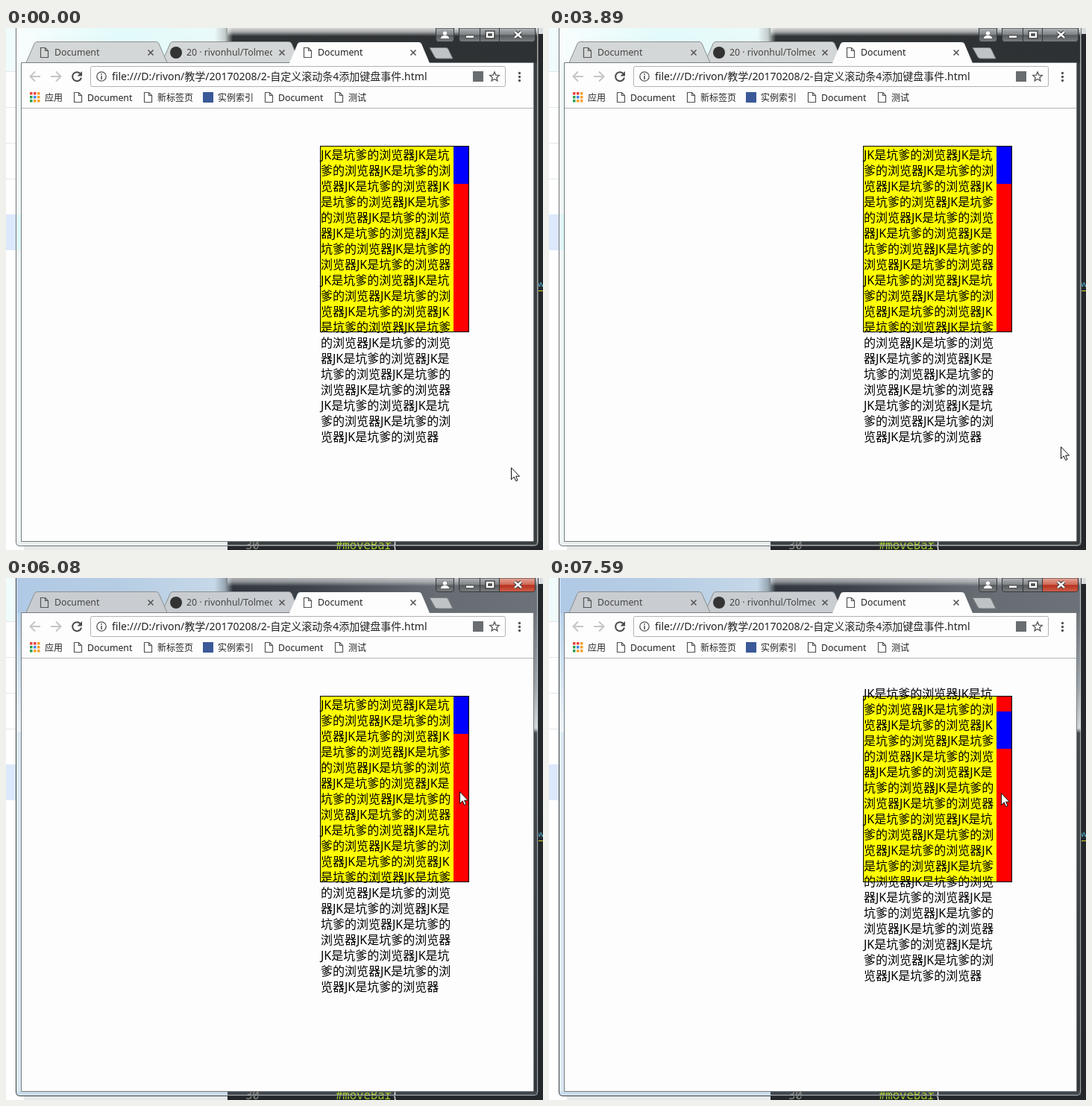
Write an HTML page that moves like this. It is 720 by 700 pixels and loops after 8 s.

```html
<!DOCTYPE html>
<html lang="zh-CN">
<head>
<meta charset="utf-8">
<title>Scroll box</title>
<style>
  html, body { margin: 0; width: 100%; height: 100%; overflow: hidden; background: #fff; }
  svg { display: block; width: 720px; height: 700px; }
  text { font-family: "Noto Sans", "Noto Sans CJK SC", "Noto Sans CJK", sans-serif; white-space: pre; }
  .code { font: 15.6px "Noto Sans Mono", monospace; }
  .line { fill: none; stroke: #555; stroke-width: 1.3; }
</style>
</head>
<body>
<svg viewBox="0 0 720 700">
  <defs>
    <linearGradient id="idleTop">
      <stop offset="0" stop-color="#f8fdfd"/><stop offset=".2" stop-color="#e2fafa"/>
      <stop offset=".38" stop-color="#eafafa"/><stop offset=".4" stop-color="#c4cccc"/>
      <stop offset=".415" stop-color="#303436"/><stop offset="1" stop-color="#2e3133"/>
    </linearGradient>
    <linearGradient id="liveTop">
      <stop offset="0" stop-color="#b0c9e5"/><stop offset=".2" stop-color="#b6cde4"/>
      <stop offset=".38" stop-color="#c6d8e8"/><stop offset=".4" stop-color="#98a6b2"/>
      <stop offset=".415" stop-color="#30373e"/><stop offset=".55" stop-color="#3a4148"/>
      <stop offset=".8" stop-color="#666c72"/><stop offset="1" stop-color="#6c7278"/>
    </linearGradient>
    <linearGradient id="liveLeft" x2="0" y2="1">
      <stop offset="0" stop-color="#b9d2ea"/><stop offset="1" stop-color="#eef5fa"/>
    </linearGradient>
    <linearGradient id="liveRight" x2="0" y2="1">
      <stop offset="0" stop-color="#70767b"/><stop offset=".15" stop-color="#9aa1a6"/>
      <stop offset=".24" stop-color="#d0d5d8"/><stop offset=".25" stop-color="#454a4f"/>
      <stop offset="1" stop-color="#33383c"/>
    </linearGradient>
    <linearGradient id="shine" x2="0" y2="1">
      <stop offset="0" stop-color="#fff" stop-opacity=".8"/><stop offset=".45" stop-color="#fff" stop-opacity=".6"/>
      <stop offset="1" stop-color="#fff" stop-opacity="0"/>
    </linearGradient>
    <linearGradient id="button" x2="0" y2="1">
      <stop offset="0" stop-color="#b4b7b9"/><stop offset=".5" stop-color="#7c8082"/>
      <stop offset=".52" stop-color="#565a5c"/><stop offset="1" stop-color="#7a7e80"/>
    </linearGradient>
    <linearGradient id="closeRed" x2="0" y2="1">
      <stop offset="0" stop-color="#e5a79a"/><stop offset=".5" stop-color="#cf6653"/>
      <stop offset=".52" stop-color="#b62f1c"/><stop offset="1" stop-color="#d0604a"/>
    </linearGradient>
    <clipPath id="tabClip"><path d="M240 20H357V46H240z"/></clipPath>
  </defs>

  <g id="desktop">
    <path fill="#fff" d="M0 0H720V700H0z"/>
    <path fill="#f0fbfc" d="M0 0H13V58H0z"/>
    <path stroke="#e4e6e8" d="M0 58.5H13M0 106.5H13M0 154.5H13M0 202.5H13"/>
    <path fill="#dce8fb" d="M0 250H13V298H0z"/>
    <path fill="#e6e9ea" d="M24 694H297V700H24z"/>
    <path fill="#23272a" d="M297 690H720V700H297zM713 8H720V700H713z"/>
    <path fill="#d9dddf" d="M713 0H720V8H713z"/>
    <path stroke="#d6d622" d="M713 352.5H720"/>
    <text x="713" y="347" font-size="11" fill="#55b7d3">w</text>
  </g>

  <g id="idle">
    <path fill="url(#idleTop)" d="M14 0H713V47H14z"/>
    <path fill="url(#shine)" d="M297 0H713V11H297z"/>
    <path fill="#f0f7f7" d="M14 47H21V688H14z"/>
    <path fill="#dff8fa" d="M14 250H21V298H14z"/>
    <path fill="#3b3f41" d="M707 47H713V690H707zM297 688H713V694H297z"/>
    <path fill="#e9eeee" d="M14 688H297V694H14z"/>
  </g>
  <g id="live">
    <path fill="url(#liveTop)" d="M14 0H713V47H14z"/>
    <path fill="url(#shine)" opacity=".75" d="M297 0H713V11H297z"/>
    <path fill="url(#liveLeft)" d="M14 47H21V206H14z"/>
    <path fill="#dbe8f2" d="M14 206H21V688H14z"/>
    <path fill="url(#liveRight)" d="M707 47H713V690H707z"/>
    <path fill="#c9dcec" d="M14 688H297V694H14z"/>
    <path fill="#42484e" d="M297 688H713V694H297z"/>
  </g>
  <text class="code" x="321" y="699" fill="#8f908a">30</text>
  <text class="code" x="442" y="699" fill="#a6d22e">#moveBar<tspan fill="#eee">{</tspan></text>
  <path fill="none" stroke="#fff" stroke-opacity=".55" d="M14.500 0V689Q14.500 693.500 19 693.500H708Q712.500 693.500 712.500 689V0"/>
  <path id="edge" fill="none" d="M13.500 0V689Q13.500 694.500 19 694.500H708Q713.500 694.500 713.500 689V0"/>

  <g id="controls" stroke="#35393b">
    <path fill="url(#button)" d="M576.500 0H600.500V15Q600.500 18.500 597 18.500H580Q576.500 18.500 576.500 15z"/>
    <path fill="url(#button)" d="M607.500 0H661.500V18.500H611Q607.500 18.500 607.500 15zM635.500 0V18"/>
    <path id="close" d="M661.500 0H709.500V15Q709.500 18.500 706 18.500H661.500z"/>
    <path fill="#fff" stroke-width=".8" d="M616.500 10H627.500V13.500H616.500z"/>
    <path fill="none" stroke="#333" stroke-width="5" d="M645 6H653V12H645z"/>
    <path fill="none" stroke="#fff" stroke-width="2.500" d="M645 6H653V12H645z"/>
    <path stroke="#333" stroke-width="4.500" d="M682 5L691 13M691 5L682 13"/>
    <path stroke="#fff" stroke-width="2.500" d="M682 5L691 13M691 5L682 13"/>
    <g fill="#fff" stroke="none"><circle cx="588.500" cy="7" r="2.600"/><path d="M583 14Q583 10 588.500 10T594 14z"/></g>
  </g>

  <g id="tabs">
    <g id="backTabs" stroke="#8b8f91">
      <path d="M209 46.500L220 21Q221 18.500 224 18.500H379Q382 18.500 383 21L394 46.500z"/>
      <path d="M27 46.500L38 21Q39 18.500 42 18.500H201Q204 18.500 205 21L216 46.500z"/>
    </g>
    <path fill="#bfc3c6" stroke="#777b7d" d="M568 26.500H590Q592 26.500 593 28.500L599 41H579Q576 41 575 39z"/>
    <path fill="#fdfdfd" d="M380 47L391 21Q392 19 395 19H553Q556 19 557 21L568 47z"/>
  </g>

  <g id="page">
    <path fill="#fdfdfd" d="M20 47H707V688H20z"/>
    <path stroke="#b4b5b6" d="M20 107.500H707"/>
    <path fill="none" stroke="#777c7f" d="M380 46.500H20.500V688.500H707M707.500 688V46.500H568"/>
  </g>

  <g id="toolbar">
    <path fill="none" stroke="#c6c6c6" stroke-width="2" d="M46 65H33M39 58.500L32.500 65L39 71.500M60 65H73M67 58.500L73.500 65L67 71.500"/>
    <path fill="none" stroke="#4c4c4c" stroke-width="2" d="M99.500 61A6 6 0 1 0 101 66.500"/>
    <path fill="#4c4c4c" d="M102 58V64.500H95.500z"/>
    <rect x="113.500" y="51.500" width="556" height="27" rx="2" fill="#fdfdfd" stroke="#b2b2b2"/>
    <circle class="line" cx="128" cy="65" r="6.200"/>
    <path stroke="#555" stroke-width="1.600" d="M128 64V69M128 61V62.700"/>
    <path fill="#6a6d70" d="M626 58H640V72H626z"/>
    <path id="star" class="line"/>
    <g fill="#555"><circle cx="688.500" cy="60.500" r="1.700"/><circle cx="688.500" cy="65.500" r="1.700"/><circle cx="688.500" cy="70.500" r="1.700"/></g>
    <circle cx="228" cy="33" r="8" fill="#333"/>
    <path fill="#3b5998" d="M264 86H278V100H264z"/>
  </g>
  <g id="apps"></g>
  <g id="icons"></g>
  <g id="labels"></g>

  <path fill="#ff0" d="M422 159H600V407H422z"/>
  <path fill="red" d="M600 159H620V407H600z"/>
  <rect id="thumb" x="600" width="20" height="50" fill="#00f"/>
  <rect x="421.500" y="158.500" width="199" height="249" fill="none" stroke="#000"/>
  <g id="content" font-size="16"></g>

  <path id="arrow" fill="#fff" stroke="#111" d="M.5 .7V16.500L4.200 13L6.700 18.500L9 17.500L6.600 12.200H11.500z"/>
  <path id="beam" fill="none" stroke="#111" d="M0 .5H2.500L3.500 1.500L4.500 .5H7M3.500 1V15M0 15.500H2.500L3.500 14.500L4.500 15.500H7"/>
</svg>
<script>
const NS = 'http://www.w3.org/2000/svg';
const $ = id => document.getElementById(id);

function add(parent, tag, attrs, text = '') {
  const el = document.createElementNS(NS, tag);
  for (const key in attrs) el.setAttribute(key, attrs[key]);
  el.textContent = text;
  return $(parent).appendChild(el);
}
const label = (x, y, text, size = 12.3, extra = {}) =>
  add('labels', 'text', { x, y, 'font-size': size, fill: '#222', ...extra }, text);
const docIcon = (x, y, fill = '#fff') =>
  add('icons', 'path', { d: `M${x} ${y}h6l4 4v9h-10zm6 0v4h4`, fill, stroke: '#555', 'stroke-width': 1.2 });

// Browser chrome
const muted = { fill: '#454545' };
label(65, 37, 'Document', 12.3, muted);
label(242, 37, '20 · rivonhul/Tolmecra', 12.3, { ...muted, 'clip-path': 'url(#tabClip)' });
label(418, 37, 'Document');
label(142, 70, 'file:///D:/rivon/教学/20170208/2-自定义滚动条4添加键盘事件.html', 14);
label(109, 98, 'Document');
label(365, 98, 'Document');
[[52, '应用'], [203, '新标签页'], [284, '实例索引'], [459, '测试']].forEach(([x, s]) => label(x, 98, s, 12));
docIcon(46.5, 26.5, 'none');
docIcon(399.5, 26.5);
[91.5, 185.5, 347.5, 441.5].forEach(x => docIcon(x, 86.5));
[194, 370, 546].forEach(x =>
  add('icons', 'path', { d: `M${x - 3.5} 29.500l7 7m0-7l-7 7`, stroke: '#555', 'stroke-width': 1.6 }));

const appColors = ['#e8453c', '#e8453c', '#f4a12a', '#2ba24c', '#4285f4', '#f4a12a', '#2ba24c', '#f4a12a', '#f4a12a'];
appColors.forEach((fill, i) =>
  add('apps', 'rect', { x: 32 + i % 3 * 5, y: 86 + Math.floor(i / 3) * 5, width: 3.5, height: 3.5, fill }));

const starPoints = Array.from({ length: 10 }, (_, i) => {
  const r = i % 2 ? 3 : 6.6, a = Math.PI * (i / 5 - 0.5);
  return `${655 + r * Math.cos(a)} ${65.5 + r * Math.sin(a)}`;
});
$('star').setAttribute('d', `M${starPoints.join('L')}z`);

// Wrapped paragraph: eleven tokens fill a row
const tokens = Array(26).fill(['JK', ...'是坑爹的浏览器']).flat();
for (let row = 0; row * 11 < tokens.length; row++)
  add('content', 'text', { x: 422, y: 176 + row * 21 }, tokens.slice(row * 11, row * 11 + 11).join(''));

// Pointer: [start ms, shape, x, y]
const pointer = [
  [0, 'arrow', 677, 589], [250, 'arrow', 699, 629], [370, '', 0, 0],
  [3890, 'arrow', 686, 561], [4010, 'beam', 505, 432],
  [4160, 'beam', 520, 398], [4280, 'beam', 541, 350], [4400, 'beam', 560, 308], [4520, 'beam', 571, 286],
  [4670, 'beam', 583, 277], [4790, 'beam', 591, 275], [4910, 'arrow', 598, 283],
  [5060, 'arrow', 602, 284], [5340, 'arrow', 608, 286], [6480, 'arrow', 608, 287], [6630, 'arrow', 606, 288]
];
const show = (id, on) => $(id).setAttribute('visibility', on ? 'visible' : 'hidden');

function render(t) {
  const active = t >= 6080;
  show('idle', !active);
  show('live', active);
  $('edge').setAttribute('stroke', active ? '#33393e' : '#6d7274');
  $('close').setAttribute('fill', active ? 'url(#closeRed)' : 'url(#button)');
  $('backTabs').setAttribute('fill', active ? '#c9cdd1' : '#d4d7d7');

  const presses = (t >= 7030) + (t >= 7590);
  $('thumb').setAttribute('y', 159 + 10 * presses);
  $('content').setAttribute('transform', `translate(0 ${-Math.ceil(7.5 * presses)})`);

  const [, shape, x, y] = pointer.findLast(step => step[0] <= t);
  for (const id of ['arrow', 'beam']) {
    show(id, id === shape);
    $(id).setAttribute('transform', `translate(${x} ${y})`);
  }
}

const start = performance.now();
function tick() {
  render((performance.now() - start) % 8000);
  requestAnimationFrame(tick);
}
tick();
</script>
</body>
</html>
```
